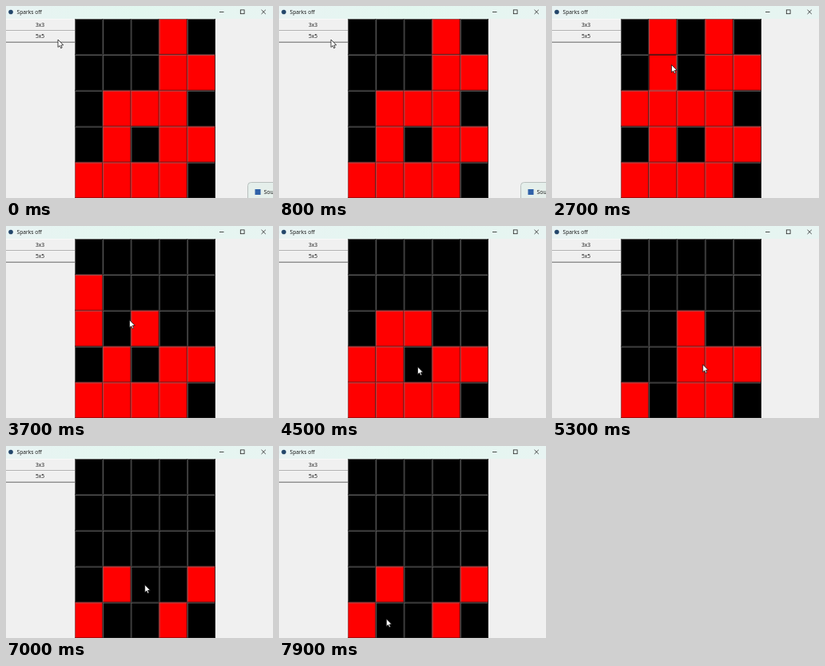
Write an HTML page with a canvas that moves like this. It is 334 px wide and 240 px high and loops after 8 s.

```html
<!DOCTYPE html>
<html lang="en">
<head>
<meta charset="utf-8">
<title>Sparks off</title>
<style>
html, body { margin: 0; width: 100%; height: 100%; overflow: hidden; background: #f0f0f0; }
canvas { display: block; width: 334px; height: 240px; }
</style>
</head>
<body>
<canvas id="stage"></canvas>
<script>
const W = 334, H = 240, LOOP = 8000, STEP = 100;
const LEFT = 86, TOP = 16, CELL_W = 35.2, CELL_H = 44.9;
const FONT = '"Open Sans", "Noto Sans", sans-serif';
const canvas = document.getElementById('stage');
const ctx = canvas.getContext('2d');
const ratio = window.devicePixelRatio || 1;
canvas.width = W * ratio;
canvas.height = H * ratio;
ctx.scale(ratio, ratio);

const START = ['00010', '00011', '01110', '01011', '11110'];

// Clicked cells as row and column, pressed in a steady rhythm.
const CLICKS = '00 10 11 13 20 31 33 33 32'.split(' ').map(([r, c], i) => ({
  r: +r, c: +c, t: 1350 + 700 * i,
  x: LEFT + (+c + 0.5) * CELL_W, y: TOP + (+r + 0.5) * CELL_H
}));

// The pointer visits each clicked cell, with a few bends on the way.
const BENDS = [
  [0, 65, 42], [900, 65, 42], [1800, 101.5, 76], [2700, 149.5, 73.5],
  [3700, 154.5, 117.5], [4500, 173.5, 176], [6100, 185.5, 195], [7900, 134.3, 216]
].map(([t, x, y]) => ({ t, x, y }));
const PATH = [...CLICKS, ...BENDS].sort((a, b) => a.t - b.t);

function rect(x, y, w, h, color) {
  ctx.fillStyle = color;
  ctx.fillRect(x, y, w, h);
}

function label(text, x, y, size, align = 'left') {
  ctx.font = `${size}px ${FONT}`;
  ctx.textAlign = align;
  ctx.fillStyle = '#111';
  ctx.fillText(text, x, y);
}

function line(x0, y0, x1, y1) {
  ctx.beginPath();
  ctx.moveTo(x0, y0);
  ctx.lineTo(x1, y1);
  ctx.stroke();
}

function pointerAt(t) {
  const i = PATH.findIndex(p => p.t >= t);
  if (i < 1) return PATH[0];
  const a = PATH[i - 1], b = PATH[i];
  const u = (t - a.t) / (b.t - a.t), e = u * u * (3 - 2 * u);
  return { x: a.x + (b.x - a.x) * e, y: a.y + (b.y - a.y) * e };
}

// A click flips its cell and the four beside it.
function isLit(r, c, t) {
  const flips = CLICKS.filter(k => k.t <= t && Math.abs(k.r - r) + Math.abs(k.c - c) < 2);
  return (+START[r][c] + flips.length) % 2 === 1;
}

function drawCell(r, c, t) {
  const x = LEFT + c * CELL_W, y = TOP + r * CELL_H;
  const lit = isLit(r, c, t);
  const pressed = CLICKS.some(k => k.r === r && k.c === c && t >= k.t - STEP && t < k.t);
  const edges = lit ? ['#a85050', '#551414'] : ['#626262', '#262626'];
  if (pressed) edges.reverse();
  rect(x, y, CELL_W, CELL_H, lit ? '#ff0000' : '#000');
  rect(x, y, CELL_W, 1, edges[0]);
  rect(x, y, 1, CELL_H, edges[0]);
  rect(x, y + CELL_H - 1, CELL_W, 1, edges[1]);
  rect(x + CELL_W - 1, y, 1, CELL_H, edges[1]);
}

function drawButton(y, text) {
  rect(0, y, 87, 14, '#f0f0f0');
  rect(0, y, 87, 0.6, '#fff');
  rect(0, y + 14, 87, 1, '#666');
  rect(86, y, 1, 14, '#777');
  label(text, 42.5, y + 9.5, 6.7, 'center');
}

function drawTitleBar() {
  const g = ctx.createLinearGradient(0, 0, W, 0);
  g.addColorStop(0, '#e9f3f3');
  g.addColorStop(0.5, '#e2f7ef');
  g.addColorStop(1, '#e8f4f2');
  rect(0, 0, W, TOP, g);
  ctx.beginPath();
  ctx.arc(6, 7.5, 2.8, 0, 7);
  ctx.fillStyle = '#24476b';
  ctx.fill();
  label('Sparks off', 13.5, 10, 6.7);
  ctx.strokeStyle = '#222';
  ctx.lineWidth = 0.8;
  line(267, 7.5, 272.5, 7.5);
  ctx.strokeRect(293.3, 4.9, 4.8, 4.8);
  line(319.5, 4.8, 324.8, 10);
  line(324.8, 4.8, 319.5, 10);
}

function drawPopup() {
  ctx.beginPath();
  ctx.roundRect(302.5, 220.5, 60, 40, 4);
  ctx.fillStyle = '#e5efeb';
  ctx.fill();
  ctx.strokeStyle = '#b9c0be';
  ctx.lineWidth = 1;
  ctx.stroke();
  rect(311.5, 229, 7, 7, '#2f62a8');
  label('Sou', 322.5, 235.3, 7);
}

function drawPointer({ x, y }) {
  ctx.save();
  ctx.translate(x, y);
  ctx.scale(1.08, 1.08);
  const arrow = new Path2D('M0 0V8.8L2 7L3.4 10L4.8 9.3L3.5 6.5L6.2 6.3Z');
  ctx.fillStyle = '#fff';
  ctx.fill(arrow);
  ctx.strokeStyle = '#111';
  ctx.lineWidth = 0.7;
  ctx.stroke(arrow);
  ctx.restore();
}

function draw(t) {
  rect(0, 0, W, H, '#f0f0f0');
  drawTitleBar();
  drawButton(16, '3x3');
  drawButton(30.7, '5x5');
  rect(LEFT + 0.5, TOP, 5 * CELL_W - 0.5, H, '#000');
  for (let r = 0; r < 5; r++) {
    for (let c = 0; c < 5; c++) drawCell(r, c, t);
  }
  if (t < 2700) drawPopup();
  drawPointer(pointerAt(t));
}

function tick() {
  const t = performance.now() % LOOP;
  draw(Math.floor(t / STEP) * STEP);
  requestAnimationFrame(tick);
}
tick();
</script>
</body>
</html>
```
